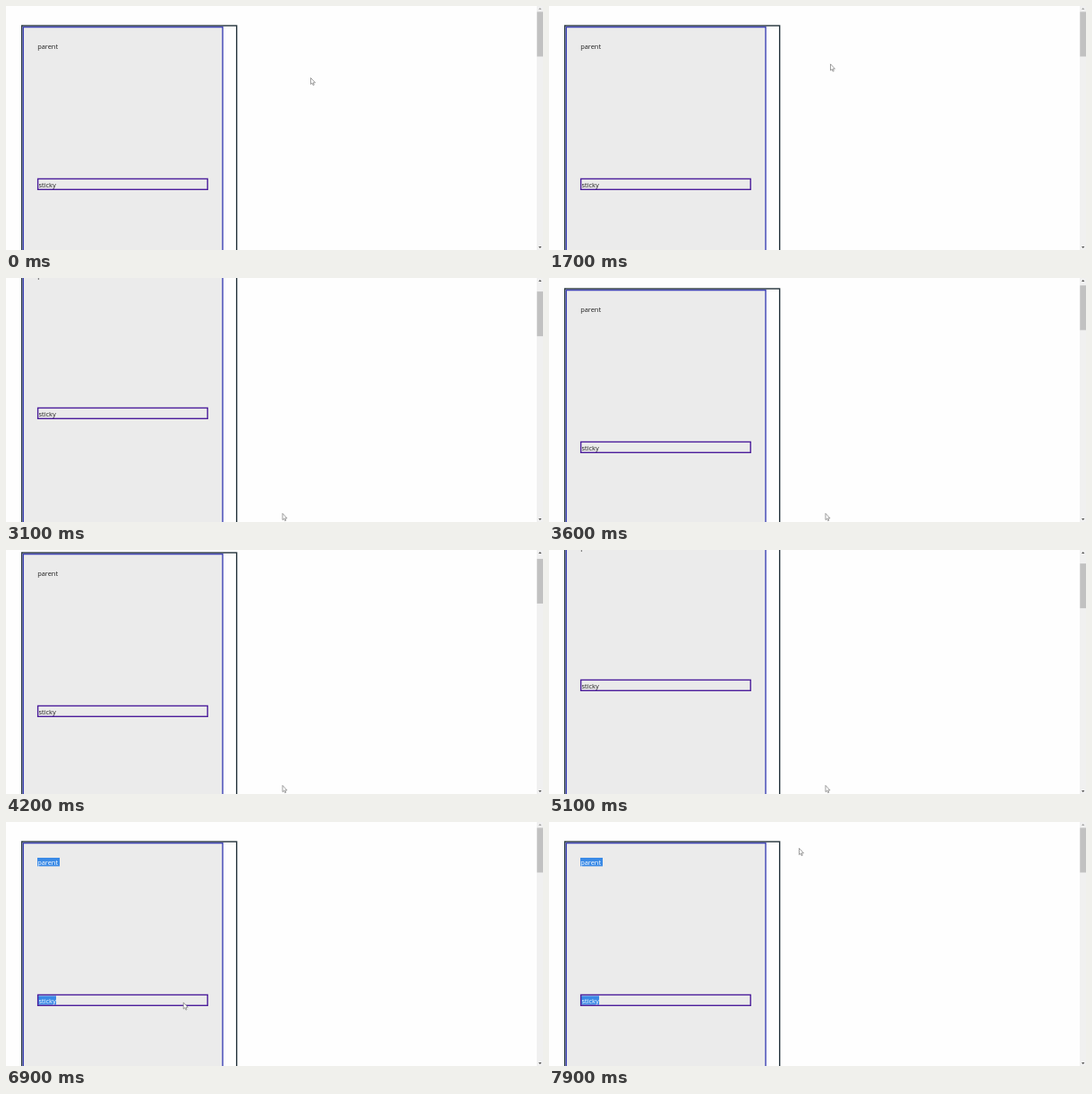
Animation of 600 by 273 pixels, one loop 8 s. Source, as an HTML page:

```html
<!DOCTYPE html>
<html lang="en">
<head>
<meta charset="utf-8">
<title>Sticky scroll demo</title>
<style>
  html, body { margin: 0; width: 100%; height: 100%; overflow: hidden; background: #fefefe; }
  svg { display: block; width: 100vw; height: 100vh; }
  text { font: 7.4px "Open Sans", "Noto Sans", sans-serif; fill: #1c1c1c; }
  .selection { fill: #3a8ae6; }
  .selected text { fill: #fff; }
  g:not(.selected) > .selection { display: none; }
</style>
</head>
<body>
<svg viewBox="0 0 600 273">
  <g id="page">
    <rect x="17.7" y="22" width="240" height="700" fill="#fefefe" stroke="#24333b" stroke-width="1.4"/>
    <rect x="19.3" y="23.6" width="222.8" height="690" fill="#ebebeb" stroke="#3c41b4" stroke-width="1.4"/>
    <g id="parent">
      <rect class="selection" x="35" y="40" width="25" height="9.5"/>
      <text x="35.2" y="47.5">parent</text>
    </g>
    <g id="sticky">
      <rect class="selection" x="36" y="194.5" width="20" height="10"/>
      <text x="36.6" y="202.6">sticky</text>
      <rect x="35.6" y="193.4" width="189.6" height="11.9" fill="none" stroke="#4b1d9b" stroke-width="1.4"/>
    </g>
  </g>
  <rect x="593" width="7" height="273" fill="#f0f0f0"/>
  <path id="up" d="M595 4l1.7-2 1.7 2z"/>
  <path d="M595 269l1.7 2 1.7-2z" fill="#505050"/>
  <rect id="thumb" x="593.3" y="6.5" width="6.7" height="50" fill="#c1c1c1"/>
  <path id="arrow" d="M.5.4V7.6L2.1 6.2 3.2 8.7 4.3 8.2 3.2 5.8H5.5Z" fill="#fff" stroke="#777" stroke-width=".7"/>
  <path id="beam" d="M-1.5-4.5h3M0-4.5v9M-1.5 4.5h3" fill="none" stroke="#333" stroke-width=".7"/>
</svg>
<script>
const LOOP = 8000, STEP = 100, SCROLL_RANGE = 48;
const PRESS = 6600, STICKY_REACHED = 6900;

// The pointer rests at each place until the next glide begins.
const home = { x: 340, y: 80 };
const glides = [
  { start: 0, duration: 600, x: 332, y: 78 },
  { start: 1100, duration: 600, x: 314, y: 64.5 },
  { start: 2100, duration: 400, x: 308.5, y: 263 },
  { start: 5400, duration: 500, x: 5, y: 246 },
  { start: 5900, duration: 300, x: 217, y: 114 },
  { start: 6300, duration: 300, x: 35, y: 44 },
  { start: PRESS, duration: 400, x: 252, y: 254 },
  { start: 7000, duration: 200, x: 105, y: 185 },
  { start: 7200, duration: 700, x: 279, y: 29 }
];

const byId = id => document.getElementById(id);
const [page, parent, sticky, thumb, up, arrow, beam] =
  ["page", "parent", "sticky", "thumb", "up", "arrow", "beam"].map(byId);

const progress = (time, start, duration) =>
  Math.min(1, Math.max(0, (time - start) / duration));

function pointerAt(time) {
  let { x, y } = home;
  for (const glide of glides) {
    const part = progress(time, glide.start, glide.duration);
    x += (glide.x - x) * part;
    y += (glide.y - y) * part;
  }
  return { x, y };
}

// Each wheel turn starts fast and settles.
const wheel = (time, start, duration) =>
  SCROLL_RANGE * (1 - (1 - progress(time, start, duration)) ** 2.25);

const scrollAt = time =>
  wheel(time, 2500, 500) - wheel(time, 3400, 400) +
  wheel(time, 4100, 500) - wheel(time, 5100, 400);

const move = (node, x, y) => node.setAttribute("transform", `translate(${x} ${y})`);
const show = (node, on) => node.setAttribute("visibility", on ? "visible" : "hidden");

function draw(now) {
  const time = Math.floor((now % LOOP) / STEP) * STEP;
  const scroll = scrollAt(time);
  const { x, y } = pointerAt(time);
  const overText = x >= 35 && x < 58 && y > 39 && y < 50;

  move(page, 0, -Math.round(scroll));
  move(thumb, 0, scroll * 0.18);
  up.setAttribute("fill", scroll > 0 ? "#505050" : "#a3a3a3");
  for (const pointer of [arrow, beam]) move(pointer, x, y);
  show(arrow, !overText);
  show(beam, overText);
  parent.classList.toggle("selected", time > PRESS);
  sticky.classList.toggle("selected", time >= STICKY_REACHED);
}

const start = performance.now();
function tick() {
  draw(performance.now() - start);
  requestAnimationFrame(tick);
}
tick();
</script>
</body>
</html>
```
